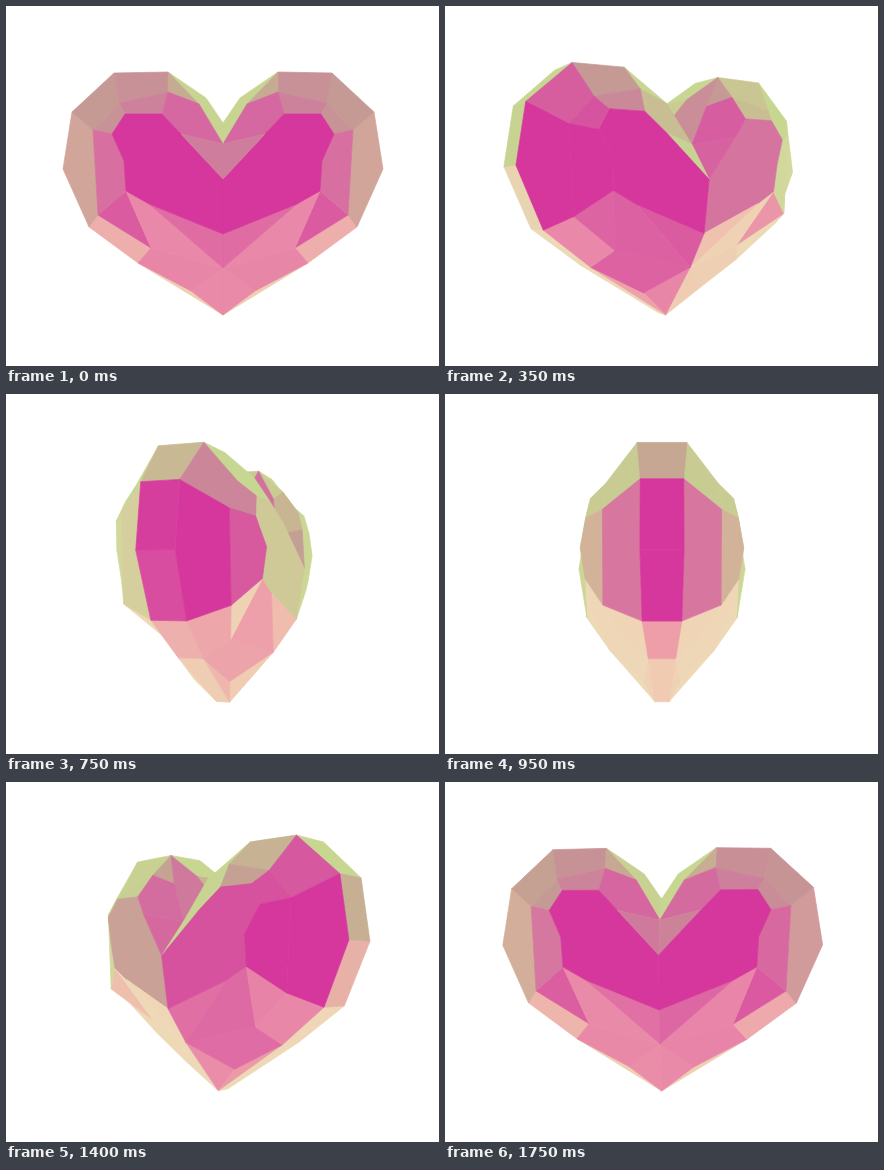
Animation, 433 px wide and 360 px high, one loop 1800 ms. Source, as an HTML page with a canvas:

```html
<!DOCTYPE html>
<html>
<head>
<meta charset="utf-8">
<style>
html, body { margin: 0; width: 100%; height: 100%; overflow: hidden; background: #fff; }
canvas { display: block; }
</style>
</head>
<body>
<canvas id="stage" width="433" height="360"></canvas>
<script>
const ctx = document.getElementById('stage').getContext('2d');
const CX = 217, CY = 192, DIST = 675, LOOP = 1800, STEP = 50;

// Corner points of a quarter of the gem: half width, height and depth as seen head-on.
const points = {
  N0: [0, 117, 12], N1: [0, 138, 55], N2: [0, 173, 83], N3: [0, 228, 75], N4: [0, 262, 52],
  O1: [17, 92, 20], O2: [55, 66, 21], O3: [109, 67, 21], O4: [151, 106, 17],
  O5: [160, 163, 17], O6: [134, 221, 16], O7: [85, 257, 12], O8: [0, 309, 7],
  M1: [24, 98, 46], M2: [55, 86, 48], M4: [104, 97, 48], M5: [130, 124, 49], M7: [125, 209, 49],
  R1: [42, 128, 72], R2: [61, 108, 64], R3: [98, 108, 62], R4: [111, 128, 65],
  R5: [99, 155, 71], R6: [97, 185, 67], R7: [74, 198, 69],
  L1: [72, 242, 32], B1: [32, 285, 18]
};
const facets = [
  'O4 O5 O6 M7 M5', 'O3 O4 M5 M4', 'O2 O3 M4 M2', 'O2 M2 M1', 'O2 O1 N0 N1 M1',
  'M4 M5 R4 R3', 'M2 M4 R3 R2', 'M2 R2 R1 N1 M1', 'N1 R1 N2',
  'N2 R1 R2 R3 R4 R5 R6 R7 N3', 'M5 M7 R6 R5 R4', 'R6 M7 L1', 'R6 R7 N4 L1',
  'R7 N3 N4', 'M7 O6 O7 L1', 'L1 O7 B1 N4', 'O7 O8 B1', 'N4 B1 O8'
];
const rim = ['N0', 'O1', 'O2', 'O3', 'O4', 'O5', 'O6', 'O7', 'O8'];

// Colour by how squarely a facet meets the eye, for facets tilted up and down.
const stops = [0.25, 0.42, 0.55, 0.67, 0.76, 0.89];
const upper = [[199, 215, 145], [202, 198, 147], [196, 157, 147], [207, 122, 157], [214, 101, 160], [214, 55, 156]];
const lower = [[238, 217, 183], [240, 200, 176], [236, 152, 168], [232, 132, 168], [220, 100, 162], [214, 55, 156]];

// Turning angle in degrees by step number.
const turn = [[0, 0], [7, 30.5], [12, 55.2], [19, 90], [24, 117.5], [32, 158], [35, 178], [36, 180]];

const clamp = v => Math.max(0, Math.min(1, v));
const mix = (a, b, t) => a + (b - a) * t;
const mixAll = (a, b, t) => a.map((v, i) => mix(v, b[i], t));
const dot = (a, b) => a[0] * b[0] + a[1] * b[1] + a[2] * b[2];

function place(name) {
  const [a, y, z] = points[name], s = (DIST - z) / DIST;
  return [a * s, (y - CY) * s, z];
}

function newell(poly) {
  const n = [0, 0, 0];
  poly.forEach((p, i) => {
    const q = poly[(i + 1) % poly.length];
    n[0] += (p[1] - q[1]) * (p[2] + q[2]);
    n[1] += (p[2] - q[2]) * (p[0] + q[0]);
    n[2] += (p[0] - q[0]) * (p[1] + q[1]);
  });
  const len = Math.hypot(...n);
  return n.map(v => v / len);
}

const middle = poly => [0, 1, 2].map(i => poly.reduce((s, p) => s + p[i], 0) / poly.length);

const faces = [];
function addFace(poly, normal, sx, sz) {
  const flip = p => [p[0] * sx, p[1], p[2] * sz];
  faces.push({ poly: poly.map(flip), normal: flip(normal), side: sx });
}

for (const f of facets) {
  const poly = f.split(' ').map(place);
  let n = newell(poly);
  if (n[2] < 0) n = n.map(v => -v);
  for (const sx of [-1, 1]) for (const sz of [-1, 1]) addFace(poly, n, sx, sz);
}
for (let i = 0; i + 1 < rim.length; i++) {
  const a = place(rim[i]), b = place(rim[i + 1]);
  const back = p => [p[0], p[1], -p[2]];
  const poly = [a, b, back(b), back(a)];
  const c = middle(poly);
  let n = newell(poly);
  if (dot(n, [c[0] - 70, c[1] + 20, 0]) < 0) n = n.map(v => -v);
  for (const sx of [-1, 1]) addFace(poly, n, sx, 1);
}

function shade(facing, tilt) {
  const v = Math.max(stops[0], Math.min(stops[5], facing));
  let i = 0;
  while (i < 4 && v > stops[i + 1]) i++;
  const t = (v - stops[i]) / (stops[i + 1] - stops[i]);
  const down = clamp((tilt + 0.1) / 0.6);
  const c = mixAll(mixAll(upper[i], upper[i + 1], t), mixAll(lower[i], lower[i + 1], t), down);
  return `rgb(${c.map(Math.round).join()})`;
}

function angleAt(step) {
  let i = 0;
  while (step > turn[i + 1][0]) i++;
  const [a, b] = [turn[i], turn[i + 1]];
  return mix(a[1], b[1], (step - a[0]) / (b[0] - a[0])) * Math.PI / 180;
}

function draw(step) {
  const angle = angleAt(step), c = Math.cos(angle), s = Math.sin(angle);
  const spin = p => [p[0] * c + p[2] * s, p[1], p[2] * c - p[0] * s];
  const seen = [];
  for (const f of faces) {
    const poly = f.poly.map(spin), n = spin(f.normal), m = middle(poly);
    const eye = [-m[0], -m[1], DIST - m[2]];
    const facing = dot(n, eye) / Math.hypot(...eye);
    if (facing > 0) seen.push({ poly, color: shade(facing, n[1]), depth: m[2], side: f.side });
  }
  // The lobe on the far side goes first.
  seen.sort((a, b) => b.side - a.side || a.depth - b.depth);

  ctx.fillStyle = '#fff';
  ctx.fillRect(0, 0, 433, 360);
  ctx.lineWidth = 0.7;
  ctx.lineJoin = 'round';
  for (const f of seen) {
    ctx.beginPath();
    for (const p of f.poly) {
      const k = DIST / (DIST - p[2]);
      ctx.lineTo(CX + p[0] * k, CY + p[1] * k);
    }
    ctx.closePath();
    ctx.fillStyle = ctx.strokeStyle = f.color;
    ctx.fill();
    ctx.stroke();
  }
}

const start = performance.now();
function tick() {
  const t = (performance.now() - start) % LOOP;
  draw(Math.floor(t / STEP));
  requestAnimationFrame(tick);
}
tick();
</script>
</body>
</html>
```
